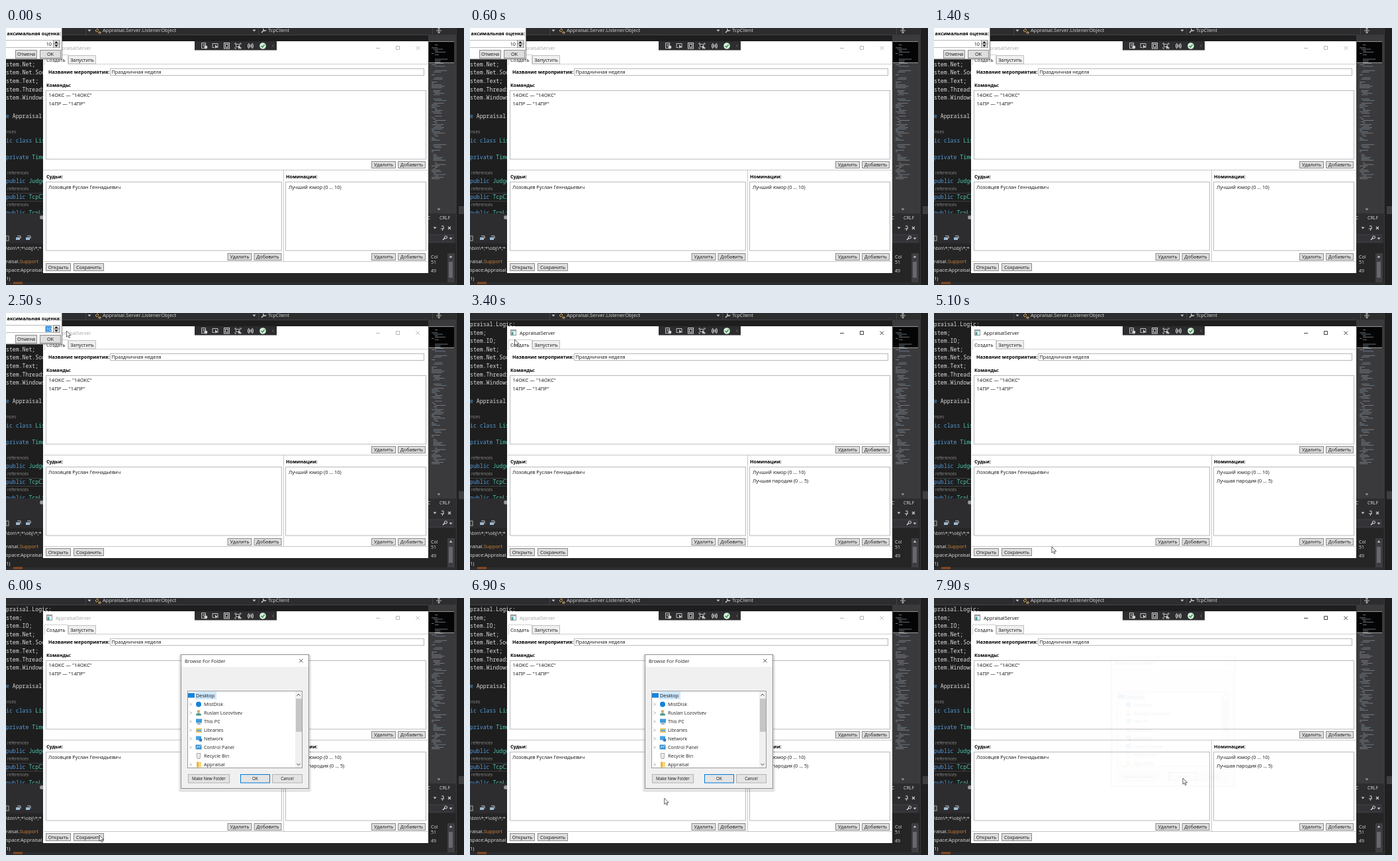
Animation of 692x388 px, one loop 8 s. Source, as an HTML page:

```html
<!DOCTYPE html>
<html lang="ru">
<head>
<meta charset="utf-8">
<title>AppraisalServer</title>
<style>
html, body { margin: 0; width: 100%; height: 100%; overflow: hidden; background: #1e1e1e; }
svg { display: block; width: 692px; height: 388px; }
text { font-family: "Open Sans", "Noto Sans", sans-serif; white-space: pre; }
.code { font-family: "Noto Sans Mono", "DejaVu Sans Mono", monospace; }
</style>
</head>
<body>
<svg id="stage" viewBox="0 0 692 388"></svg>
<script>
const LOOP = 8000;
const BLUE = '#569cd6', TEAL = '#4ec9b0', PALE = '#dcdcdc', GREY = '#8c8c8c';

// Text is placed by its vertical centre.
const text = (x, cy, s, fill = '#111', size = 7.3, extra = '') =>
  `<text x="${x}" y="${cy + size * .36}" font-size="${size}" fill="${fill}" ${extra}>${s}</text>`;
const bold = (x, cy, s) => text(x, cy, s, '#000', 7.2, 'font-weight="700"');
const mid = (x, cy, s, size) => text(x, cy, s, '#111', size, 'text-anchor="middle"');
const rect = (x, y, w, h, fill, stroke = 'none') =>
  `<rect x="${x}" y="${y}" width="${w}" height="${h}" fill="${fill}" stroke="${stroke}"/>`;
const path = (d, stroke, width = 1, fill = 'none') =>
  `<path d="${d}" stroke="${stroke}" stroke-width="${width}" fill="${fill}"/>`;
const dot = (x, y, r, fill) => `<circle cx="${x}" cy="${y}" r="${r}" fill="${fill}"/>`;
const group = (id, body) => `<g id="${id}">${body}</g>`;
const down = (x, y, c = '#c8c8c8') => path(`M${x - 2.5} ${y - 1.5}h5l-2.5 3z`, 'none', 0, c);
const up = (x, y, c = '#c8c8c8') => path(`M${x - 2.5} ${y + 1.5}h5l-2.5-3z`, 'none', 0, c);
const button = (x, y, w, h, s, size, stroke = '#8a8a8a', fill = '#dedede') =>
  rect(x + .5, y + .5, w, h, fill, stroke) + mid(x + .5 + w / 2, y + .5 + h / 2, s, size);
const code = (cy, parts, x = 0) => `<text class="code" x="${x}" y="${cy + 3}" font-size="8.2">` +
  parts.map(([s, c]) => `<tspan fill="${c}">${s}</tspan>`).join('') + '</text>';
const noise = n => { const v = Math.sin(n * 91.7) * 4375.5; return v - Math.floor(v); };

function editor() {
  let s = rect(0, 0, 692, 388, '#1e1e1e') + rect(0, 0, 680, 10, '#2d2d30');
  s += path('M120.5 0V10M381.5 0V10M644.5 0V10M0 10.5H680', '#434346');
  s += down(126, 4) + down(375, 4);
  s += path('M135 4l3-3 2 2-3 3zM140 6h3v2h-3z', '#d7a85c', 1);
  s += path('M386 7l4-4m-1-2a2 2 0 1 0 4 2', '#c8c8c8', 1.5);
  s += text(146, 3.5, 'Appraisal.Server.ListenerObject', PALE, 7.6) + text(396, 3.5, 'TcpClient', PALE, 7.5);
  s += path('M650 4h8M654 0v8M652 2l2-2 2 2M652 6l2 2 2-2', '#d0d0d0', .9);

  ['praisal.Logic;', 'stem;', 'stem.IO;', 'stem.Net;', 'stem.Net.Sockets;', 'stem.Text;', 'stem.Threading;', 'stem.Windows;']
    .forEach((line, i) => s += code(17 + i * 12.6, [[line, PALE]]));
  s += code(133, [['e ', BLUE], ['Appraisal', PALE]]);
  s += text(15, 157, 'references', GREY, 6.5, 'text-anchor="end"');
  s += code(170, [['ic class ', BLUE], ['ListenerObject', TEAL]]);
  s += code(195, [['private ', BLUE], ['Timer', TEAL]]);
  ['Judge', 'TcpClient', 'TcpListener'].forEach((type, i) => {
    const y = 231 + i * 24;
    s += text(2, y - 12, 'references', GREY, 6.5) + code(y, [['public ', BLUE], [type, TEAL]]);
  });
  s += path('M0 249.5H56M0 261.5H56', '#46464a', .8);

  // Code map with its viewport
  s += rect(638, 10, 42, 270, '#3a3a3d') + rect(639, 20, 38, 32, '#050505');
  s += path('M639 20.5H677M639 52.5H677', '#b8b8b8', .8);
  for (let i = 0; i < 96; i++) {
    const y = 23 + i * 2.15, indent = 643 + Math.floor(noise(i) * 3) * 2.5;
    if (noise(i + 200) > .22)
      s += rect(indent, y, 3 + noise(i + 400) * 17, .8, i % 4 ? '#85898d' : '#6f8494');
  }
  s += down(654, 274, '#999') + rect(680, 0, 12, 388, '#1f1f20');
  s += path('M680.5 0V388', '#38383b') + rect(684, 269, 8, 12, '#3e3e42');
  return s;
}

function outputPane() {
  let s = rect(0, 280, 680, 108, '#2d2d30') + rect(0, 325, 680, 59, '#252526');
  s += dot(54, 286, 3, '#9a9a9a') + text(637, 286, 'C', PALE, 7) + text(655, 286, 'CRLF', PALE, 7);
  s += down(648, 302) + path('M657 303h5M658 299h3v4M659.5 303v3', '#d0d0d0', 1);
  s += path('M668 300l4 4m0-4l-4 4', '#d0d0d0', 1.1);
  s += rect(630, 312, 46, 11, '#333337', '#434346') + path('M660 320l3-3', '#ddd', 1.5);
  s += `<circle cx="664.5" cy="316" r="2" fill="none" stroke="#ddd"/>` + down(672, 318);
  s += rect(0, 314, 4, 7, 'none', '#aaa');
  for (const x of [15, 30])
    s += rect(x, 316, 6, 4, '#9ab8d0') + path(`M${x + 2} 314h5v4`, '#c8c8c8', 1);
  s += text(0, 332, '\\bin\\*;*\\obj\\*;*', PALE, 7.5);
  s += text(0, 352, 'raisal.<tspan fill="#d0853c">Support</tspan>', PALE, 7.5);
  s += text(0, 365, 'space:Appraisal.Server', PALE, 7.5) + text(0, 378, '1)', PALE, 7.5);
  s += text(642, 353, '51', PALE, 7) + rect(638, 340, 30, 11, '#252526');
  s += text(642, 345, 'Col', PALE, 7) + text(642, 366, '49', PALE, 7);
  s += rect(667, 340, 11, 44, '#3e3e42') + up(672, 345) + rect(669, 353, 6, 24, '#68686b');
  return s + rect(11, 383.5, 14, 3, '#8a4b20');
}

function appWindow() {
  let s = rect(56, 20, 582, 350, '#fff');
  s += rect(61.5, 25.5, 8, 8, '#fff', '#8a9298') + rect(62, 26, 7, 1.5, '#9aa8b0') + rect(62.5, 28.5, 3, 4.5, '#3f9c94');
  s += group('caption', text(75, 30, 'AppraisalServer', 'currentColor') +
    path('M559 30.5h6M589.5 27.5h5v5h-5zM619.5 27.5l5.5 5.5m0-5.5l-5.5 5.5', 'currentColor', .8));
  s += path('M57 54.5H58.5V40.5H93.5V54.5H637', '#c4c4c4', .8);
  s += rect(94.5, 41.5, 41, 12.5, '#efefef', '#c0c0c0');
  s += text(61, 48, 'Создать') + mid(115, 48, 'Запустить');
  s += bold(64, 66, 'Название мероприятия:') + rect(157.5, 61.5, 474, 10, '#fff', '#b6b8bc');
  s += text(159.5, 66.5, 'Праздничная неделя');
  s += bold(61, 86, 'Команды:') + bold(61, 224, 'Судьи:') + bold(423, 224, 'Номинации:');
  s += rect(60.5, 94.5, 574, 103.5, '#fff', '#b6b8bc');
  s += rect(60.5, 232.5, 356, 103.5, '#fff', '#b6b8bc') + rect(422.5, 232.5, 212, 103.5, '#fff', '#b6b8bc');
  s += text(64.5, 101.5, '14ОКС — "14ОКС"', '#111', 7.6) + text(64.5, 114.5, '14ПР — "14ПР"', '#111', 7.6);
  s += text(64, 240.5, 'Лозовцев Руслан Геннадьевич') + text(427, 240.5, 'Лучший юмор (0 ... 10)');
  s += group('parody', text(427, 253.5, 'Лучшая пародия (0 ... 5)'));
  s += path('M57 214.5H637M57 352.5H637M419.5 215V352', '#c6c6c6');
  for (const [x, y] of [[552, 201], [334.5, 340], [552, 340]])
    s += button(x, y, 36, 10, 'Удалить') + button(x + 40, y, 41, 10, 'Добавить');
  s += button(60, 355, 37, 11, 'Открыть') + button(102, 355, 45, 11, 'Сохранить');
  return s;
}

function debugBar() {
  const c = '#d2d2d2';
  let s = rect(285, 20, 124, 13.5, '#2d2d30');
  s += path('M295.5 22.5h6v8h-6zM297 25h4M297 27h3', c, .9) + dot(302, 29, 2.4, c);
  s += path('M312 23.5h8v6M312 23.5v6h3', c, .9) + path('M316 25v6l1.6-1.5 3 .1z', 'none', 0, c);
  s += rect(329.5, 22.5, 8, 8.5, 'none', c) + rect(331.5, 24.5, 4, 4.5, 'none', c);
  s += path('M346 25v-2h2m5 0h2v2m0 4v2h-2m-5 0h-2v-2', c, .9) + path('M347.5 24.5h5.5v4h-5.5z', c, .9) + path('M351 26v6l1.6-1.5 3 .1z', 'none', 0, c);
  s += path('M367 23q-3 4 0 8M372 23q3 4 0 8M368 24v6M371 24v6M367 27h5', c, 1.1);
  s += dot(388, 27, 4.8, '#d9f0dc') + path('M385.5 27l2 2 3.2-4', '#258b3b', 1.3);
  return s + path('M404.5 25l-2 2 2 2', '#777', .8);
}

function scoreDialog() {
  let s = rect(-1, -1, 85.5, 48, '#fff', '#777');
  s += text(83, 8, 'аксимальная оценка:', '#000', 7.2, 'font-weight="700" text-anchor="end"');
  s += rect(-1, 18.5, 82.5, 11, '#fff', '#b6b8bc') + `<rect id="mark" x="59.5" y="19.5" width="9.5" height="9" fill="#3d91dc"/>`;
  s += text(69, 24, '10', '#111', 7.3, 'id="score" text-anchor="end"');
  s += rect(71.5, 18.5, 9.5, 5.5, '#dedede', '#999') + rect(71.5, 24, 9.5, 5.5, '#dedede', '#999');
  s += up(76, 21.5, '#111') + down(76, 27, '#111');
  return s + button(14, 33, 32, 12, 'Отмена') + button(51, 33, 31, 12, 'OK');
}

function folderDialog() {
  let s = `<rect x="261" y="85" width="200" height="208" rx="3" fill="#000" opacity=".1"/>`;
  s += rect(264.5, 85.5, 193, 202, '#f0f0f0', '#8c8c8c') + rect(265, 86, 192, 18, '#fff');
  s += text(270, 95, 'Browse For Folder', '#222') + path('M443 92l5.5 5.5m0-5.5l-5.5 5.5', '#333', .8);
  s += rect(274.5, 140.5, 173, 116, '#fff', '#9a9a9a') + rect(286, 141.5, 32, 11.5, '#cce8ff');
  s += rect(275, 143.5, 10, 7, '#1683d8') + text(287, 147.5, 'Desktop');
  const rows = ['MistDisk', 'Ruslan Lozovtsev', 'This PC', 'Libraries', 'Network', 'Control Panel', 'Recycle Bin', 'Appraisal'];
  const icons = [
    y => dot(291, y, 4, '#1683d8'),
    y => dot(291, y - 2.4, 2.2, '#d9a878') + path(`M287 ${y + 4}q0-4 4-4t4 4z`, 'none', 0, '#4f9c8c'),
    y => rect(287, y - 4, 9, 6, '#3a9bdc') + rect(289, y + 3, 5, 1.2, '#777'),
    y => rect(287, y - 3, 9, 7, '#f2cf69') + rect(288, y - 1, 7, 3, '#69acd9'),
    y => rect(287, y - 4, 8, 6, '#45a5df') + dot(294, y + 2, 2.4, '#3b78b9'),
    y => rect(286.5, y - 4, 9, 7, '#3a8fcf') + path(`M288 ${y + 1}l2-3 2 2 2-3`, '#fff', 1),
    y => path(`M288 ${y - 4}h6l-1 8h-4z`, '#999', .8, '#e4edf2'),
    y => rect(288, y - 4, 7, 8, '#f7d774') + rect(288, y - 4, 3, 8, '#e5b849')
  ];
  rows.forEach((name, i) => {
    const y = 160.5 + i * 13;
    if (name !== 'Recycle Bin') s += path(`M278 ${y - 2}l2 2-2 2`, '#777', .8);
    s += icons[i](y) + text(299, y, name, '#222');
  });
  s += rect(437, 141, 10, 115, '#f0f0f0') + rect(438, 152, 9, 50, '#c6c6c6');
  s += path('M439.5 147.5l2.5-2.5 2.5 2.5M439.5 250l2.5 2.5 2.5-2.5', '#444');
  return s + button(275, 266, 62, 12.5, 'Make New Folder', 6.3, '#b0b0b0', '#e4e4e4') +
    button(354, 266, 44, 12.5, 'OK', 6.3, '#0078d7', '#e4e4e4') + button(402, 266, 45, 12.5, 'Cancel', 6.3, '#b0b0b0', '#e4e4e4');
}

const $ = id => document.getElementById(id);
const show = (id, on) => $(id).style.display = on ? '' : 'none';
const clamp = v => Math.max(0, Math.min(1, v));

$('stage').innerHTML = editor() + outputPane() + appWindow() + debugBar() +
  group('scoreBox', scoreDialog()) + group('folderBox', folderDialog()) +
  group('pointer', path('M0 0v9.2l2.1-2 1.5 3.4 1.5-.7-1.5-3.2h3z', '#222', .7, '#fff'));

// Pointer stops: time, x, y
const route = [
  [0, -20, 26], [1700, -20, 26], [2150, 58, 25], [2500, 91.5, 27], [2750, 91.5, 27],
  [3100, 67.5, 40], [3600, 67.5, 40], [4500, 235, 310], [5100, 178, 353],
  [5400, 141, 358], [6300, 141, 358], [7300, 376, 272], [LOOP, 376, 272]
];

function pointerAt(t) {
  const i = route.findIndex((stop, n) => n && t <= stop[0]);
  const [t0, x0, y0] = route[i - 1], [t1, x1, y1] = route[i];
  const p = (t - t0) / (t1 - t0), k = p * p * (3 - 2 * p);
  return [x0 + (x1 - x0) * k, y0 + (y1 - y0) * k];
}

function draw(now) {
  const t = now % LOOP;
  const added = t >= 3200, selected = t >= 2300 && t < 2850;
  const opacity = clamp((t - 5500) / 150) * clamp((7915 - t) / 250);
  const active = added && (t < 5500 || t >= 7665);
  $('caption').style.color = active ? '#111' : '#a5a5a5';
  show('parody', added);
  show('scoreBox', !added);
  show('mark', selected);
  $('score').textContent = t < 2850 ? '10' : '5';
  $('score').setAttribute('fill', selected ? '#fff' : '#111');
  show('folderBox', opacity > 0);
  $('folderBox').setAttribute('opacity', opacity);
  const scale = .96 + .04 * opacity;
  $('folderBox').setAttribute('transform', `translate(361 187) scale(${scale}) translate(-361 -187)`);
  $('pointer').setAttribute('transform', `translate(${pointerAt(t)})`);
  requestAnimationFrame(draw);
}
requestAnimationFrame(draw);
</script>
</body>
</html>
```
